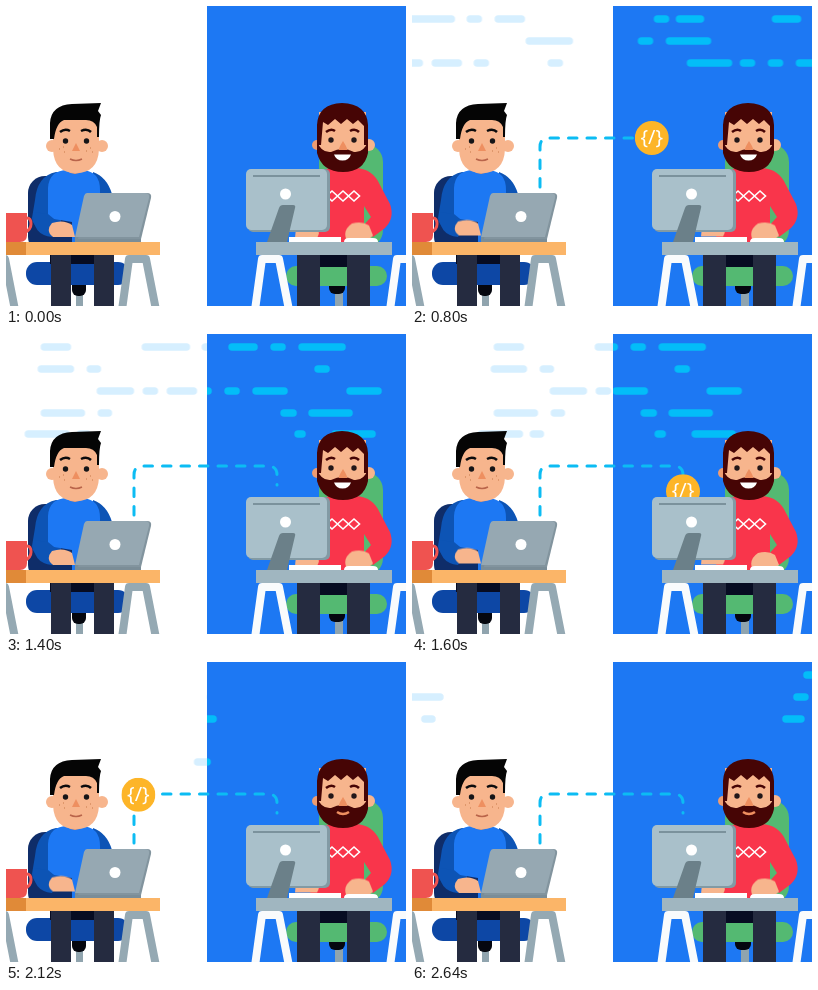
An HTML page without scripts that plays this animation: 400 by 300 pixels, repeating every 2680 ms.

```html
<!DOCTYPE html>
<html lang="en">
<head>
<meta charset="utf-8">
<title>Code exchange</title>
<style>
  html, body { margin: 0; width: 100%; height: 100%; overflow: hidden; background: #fff; }
  svg { display: block; width: 100vw; height: 100vh; }
  .lines { fill: none; stroke-width: 7.5; stroke-linecap: round; }
  .left-lines { stroke: #d6efff; animation: drift-right 2.68s linear infinite; }
  .right-lines { stroke: #03bdf8; animation: drift-left 2.68s linear infinite; }
  .reveal { stroke-dasharray: 260 260; animation: reveal 2.68s linear infinite; }
  .badge {
    offset-path: path("M128 202V141Q128 132 137 132H262Q271 132 271 141V184");
    offset-rotate: 0deg;
    animation: travel 2.68s linear infinite;
  }
  .badge text { font: 300 20px "Noto Sans", "Open Sans", sans-serif; }
  .tap { animation: tap .32s steps(2, jump-none) infinite alternate; }
  .late { animation-delay: -.16s; }
  .teeth { transform-origin: 337px 150px; animation: grin 2.68s linear infinite; }

  @keyframes drift-right { to { transform: translateX(630px); } }
  @keyframes drift-left { to { transform: translateX(-614px); } }
  @keyframes reveal {
    0%, 4.1% { stroke-dashoffset: 260; }
    41.4%, 100% { stroke-dashoffset: 0; }
  }
  @keyframes travel {
    0%, 4.1% { offset-distance: 0%; transform: scale(0); }
    8% { offset-distance: 10.4%; transform: none; }
    41.4%, 56.5% { offset-distance: 100%; transform: none; }
    84% { offset-distance: 11.9%; transform: none; }
    87.7%, 100% { offset-distance: 0%; transform: scale(0); }
  }
  @keyframes tap { to { transform: translateY(-1.5px); } }
  @keyframes grin {
    0%, 70% { transform: none; }
    77%, 100% { transform: scale(.8, 0); }
  }
</style>
</head>
<body>
<svg viewBox="0 0 400 300" preserveAspectRatio="none">
  <defs>
    <clipPath id="left-half"><path d="M0 0h201v300H0z"/></clipPath>
    <clipPath id="right-half"><path d="M201 0h199v300H201z"/></clipPath>
    <mask id="route-mask" maskUnits="userSpaceOnUse" x="0" y="0" width="400" height="300">
      <path class="reveal" d="M128 202V141Q128 132 137 132H262Q271 132 271 141V184" fill="none" stroke="#fff" stroke-width="8"/>
    </mask>
    <path id="trestle" d="M-16 304L-9 253H8L18 304" fill="none" stroke-width="8" stroke-linejoin="round"/>
    <path id="diamond" d="M-5.500 0L0 -5L5.500 0L0 5Z" fill="none" stroke="#fff" stroke-width="1.600"/>
  </defs>

  <path fill="#fff" d="M0 0h201v300H0z"/>
  <path fill="#1d78f3" d="M201 0h199v300H201z"/>

  <!-- Code lines drift from both sides and vanish at the middle -->
  <g clip-path="url(#left-half)">
    <g class="lines left-lines">
      <path transform="translate(-188)" d="M86 13h23M117 35h40M65 57h8M139 57h8"/>
      <path transform="translate(-329)" d="M38 13h23M139 13h41M199 13h8M35 35h29M84 35h7M94 57h30M140 57h8M164 57h23M38 79h37M95 79h7M22 100h38M74 100h7"/>
      <path transform="translate(-620)" d="M-11 35h38M12 57h7"/>
    </g>
  </g>
  <g clip-path="url(#right-half)">
    <g class="lines right-lines">
      <path transform="translate(183)" d="M246 13h8M268 13h21M230 35h8M258 35h38M279 57h38"/>
      <path transform="translate(321)" d="M226 13h22M268 13h8M296 13h40M312 35h8M194 57h8M222 57h8M250 57h28M344 57h28M278 79h9M306 79h37M292 100h4M329 100h37"/>
      <path transform="translate(605)" d="M395 13h6M385 35h8M374 57h15"/>
    </g>
  </g>

  <g mask="url(#route-mask)">
    <path d="M128 181V141Q128 132 137 132H262Q271 132 271 141V151" fill="none" stroke="#0cbcf3" stroke-width="3" stroke-linecap="round" stroke-dasharray="8.5 10"/>
  </g>
  <g class="badge">
    <circle r="17" fill="#fdb528"/>
    <text y="6" text-anchor="middle" fill="#fff">{/}</text>
  </g>

  <!-- Left desk -->
  <g>
    <rect x="22" y="170" width="74" height="78" rx="17" fill="#0f2d69"/>
    <path fill="#90a4ae" d="M70 285h7v15h-7z"/>
    <rect x="66" y="272" width="14" height="18" rx="6" fill="#05070f"/>
    <rect x="20" y="256" width="103" height="23" rx="11" fill="#0d47a5"/>
    <path fill="#070c22" d="M44 247h64v11H44z"/>
    <path fill="#252b40" d="M45 249h20v51H45zM88 249h20v51H88z"/>
    <path fill="#0d54b5" d="M50 166Q31 170 29 194L26 212Q27 224 45 224H55V166zM87 166Q101 171 106 188H87z"/>
    <path fill="#1d78f3" d="M42 182Q43 164 62 164H76Q94 165 94 184V236H66V216L42 212z"/>
    <path fill="#0d54b5" d="M27 206L42 208L53 217L46 231Q26 229 27 206z"/>
    <path class="tap" fill="#f7b58d" d="M46 217q12-4 20 2l3 12H47q-8-6-1-14z"/>
    <path fill="#ec9f73" d="M61 156h16v9q-8 6-16 0z"/>
    <circle cx="46" cy="140" r="6" fill="#f7b58d"/>
    <circle cx="96" cy="140" r="6" fill="#f7b58d"/>
    <path fill="#f7b58d" d="M47 108H93V143Q92 167 70 167T47 143z"/>
    <path fill="#050505" d="M44 133V117Q45 99 66 98L95 97L92 105L95 109Q93 114 93 131H91V121Q88 114 80 114H58Q50 117 48 133z"/>
    <path d="M54 126q5-4 10-1M75 125q6-3 10 1" fill="none" stroke="#0b0b0d" stroke-width="2.500"/>
    <g fill="#151518"><circle cx="59.500" cy="135" r="2.700"/><circle cx="80.500" cy="135" r="2.700"/></g>
    <path fill="#ee8f60" d="M70 137l4 8h-8z"/>
    <path d="M53 143h1m3-2h1m0 5h1M80 145h1m3-3h1m1 4h1" stroke="#d88d60" stroke-width="1.500"/>
    <path d="M64 153q6 3 12 0" fill="none" stroke="#b9644a" stroke-width="1.500"/>
    <g stroke="#95a9b3"><use href="#trestle" x="-9"/><use href="#trestle" x="132"/></g>
    <path fill="#fbb568" d="M0 236h154v13H0z"/>
    <path fill="#e08a38" d="M0 236h20v13H0z"/>
    <path d="M18 212h3q4 0 4 6t-7 9" fill="none" stroke="#ef5350" stroke-width="3"/>
    <path fill="#ef5350" d="M0 207h21v22q0 7-7 7H0z"/>
    <path fill="#7b8d97" d="M69 231h66v5H69z"/>
    <path fill="#82949e" d="M81 187h60q5 0 4 5l-10 41H72z"/>
    <path fill="#96a8b2" d="M81 187h58q5 0 4 5l-10 39H69l9-41q1-3 3-3z"/>
    <circle cx="109" cy="210.500" r="5.500" fill="#fff"/>
  </g>

  <!-- Right desk -->
  <g>
    <rect x="313" y="138" width="64" height="104" rx="18" fill="#54b972"/>
    <path fill="#90a4ae" d="M329 285h8v15h-8z"/>
    <rect x="323" y="272" width="16" height="16" rx="6" fill="#05070f"/>
    <rect x="280" y="260" width="101" height="20" rx="10" fill="#54b972"/>
    <path fill="#070c22" d="M291 247h73v14h-73z"/>
    <path fill="#252b40" d="M291 249h23v51h-23zM341 249h23v51h-23z"/>
    <path fill="#f9354b" d="M307 176Q311 163 326 162H350Q367 163 374 179L384 198Q389 212 379 222L367 231L356 221L365 211L358 200V236H304z"/>
    <g><use href="#diamond" x="326" y="190"/><use href="#diamond" x="337" y="190"/><use href="#diamond" x="348" y="190"/></g>
    <circle cx="311" cy="139" r="5" fill="#ee9c72"/>
    <circle cx="363" cy="139" r="6" fill="#f7b58d"/>
    <path fill="#f7b58d" d="M313 106H360V146Q357 163 337 163T313 146z"/>
    <path fill="#460505" d="M311 139V119Q312 98 336 97Q361 98 362 119V139H358V120L352 114L347 118L341 113L335 118L329 113L322 119L317 116L315 139z"/>
    <path fill="#460505" d="M311 135Q315 147 325 146Q337 140 348 146Q358 147 362 135V147Q358 166 337 166T311 147z"/>
    <path d="M320 126q5-4 9-1M344 125q5-3 9 1" fill="none" stroke="#460505" stroke-width="2.500"/>
    <g fill="#221719"><circle cx="325" cy="134" r="2.700"/><circle cx="348" cy="134" r="2.700"/></g>
    <path fill="#ee8f60" d="M337 135q5 8 4 9h-8q-1-1 4-9z"/>
    <path d="M331 150q6 4 12 0" fill="none" stroke="#ee8f60" stroke-width="2.500"/>
    <path class="teeth" fill="#fff" d="M328 148.500h17q-2 6-8.500 6t-8.500-6z"/>
    <g stroke="#f9fbfc"><use href="#trestle" x="265"/><use href="#trestle" x="400"/></g>
    <path fill="#a0b6c0" d="M250 236h136v13H250z"/>
    <path class="tap" fill="#f7b58d" d="M290 222h20q5 4 1 10h-22z"/>
    <path fill="#fff" d="M283 231h52v5h-52z"/>
    <path class="tap late" fill="#f7b58d" d="M346 219q10-3 17 2l4 10-3 3h-24q-3-9 6-15z"/>
    <path fill="#fff" d="M338 236q0-4 5-4h24q5 0 5 4z"/>
    <rect x="242" y="163" width="82" height="63" rx="5" fill="#829aa4"/>
    <rect x="240" y="163" width="81" height="61" rx="5" fill="#a9c0ca"/>
    <path d="M247 170h67" stroke="#7b929c" stroke-width="2"/>
    <path fill="#6b8089" d="M273 202q1-3 4-3h10q3 0 2 3l-8 34h-20z"/>
    <circle cx="279.500" cy="188" r="5.500" fill="#fff"/>
  </g>
</svg>
</body>
</html>
```
